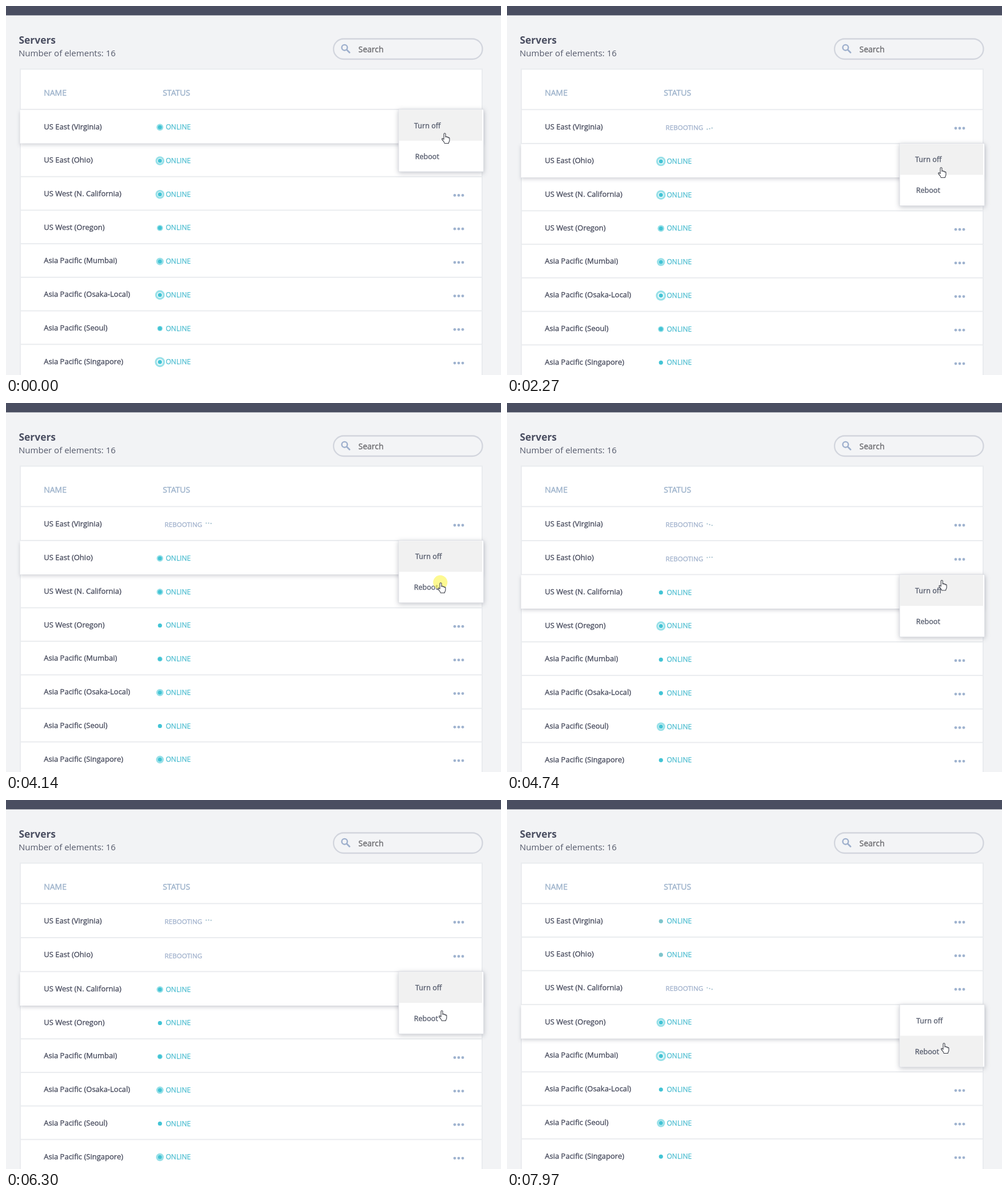
Recreate the animation shown at these times as an HTML page. Size 866 by 646 pixels, loop 8000 ms.

```html
<!DOCTYPE html>
<html lang="en">
<head>
<meta charset="utf-8">
<title>Servers</title>
<style>
  html, body { margin: 0; width: 100%; height: 100%; overflow: hidden; background: #f2f3f5; }
  svg { display: block; width: 866px; height: 646px; font-family: "Open Sans", "Noto Sans", sans-serif; }
  text { white-space: pre; }
  .title { font-size: 17.4px; font-weight: 700; fill: #4a4e61; }
  .count { font-size: 15px; fill: #555a6b; }
  .search { font-size: 14px; fill: #6a6a6e; stroke: #6a6a6e; stroke-width: .35px; }
  .head { font-size: 14px; fill: #9fb4cc; stroke: #9fb4cc; stroke-width: .45px; }
  .name { font-size: 13px; fill: #464a5c; stroke: #464a5c; stroke-width: .32px; }
  .online { font-size: 12px; fill: #4bbdd0; stroke: #4bbdd0; stroke-width: .25px; }
  .fresh { fill: #3cc2d6; stroke: #3cc2d6; stroke-width: .45px; }
  .reboot { font-size: 11.6px; fill: #9fb0cb; stroke: #9fb0cb; stroke-width: .3px; }
  .item { font-size: 12.6px; fill: #555b6c; stroke: #555b6c; stroke-width: .35px; }
  .line { fill: #eaecef; }
  .more { fill: #9fb3cf; }
  #lift { fill: #fff; filter: drop-shadow(0 3px 3px rgba(40, 45, 70, .2)); }
  #panel { fill: #fff; filter: drop-shadow(0 2px 4px rgba(40, 45, 70, .28)); }
</style>
</head>
<body>
<svg viewBox="0 0 866 646">
  <rect width="866" height="646" fill="#f2f3f5"/>
  <rect width="866" height="16.4" fill="#4a4e61"/>
  <text class="title" x="22.5" y="66">Servers</text>
  <text class="count" x="22" y="88">Number of elements: 16</text>
  <rect x="573" y="57.5" width="260.5" height="35.5" rx="17.75" fill="#f3f4f6" stroke="#d2d5dd" stroke-width="2.3"/>
  <g fill="none" stroke="#9fb0cd" stroke-width="2.4">
    <circle cx="592.3" cy="72.8" r="4.9"/>
    <path d="M596 76.5l5 5" stroke-width="2.8" stroke-linecap="round"/>
  </g>
  <text class="search" x="616.5" y="81">Search</text>
  <rect x="25" y="110.5" width="808" height="560" fill="#fff" stroke="#eaecef" stroke-width="2"/>
  <text class="head" x="66.2" y="157">NAME</text>
  <text class="head" x="274.2" y="157">STATUS</text>
  <g id="lines"></g>
  <rect id="lift" x="24.5" width="809" height="58.8"/>
  <g id="rows"></g>
  <g id="menu">
    <rect id="panel" x="687" width="148.5" height="109" stroke="#dfe1e6" stroke-width="1"/>
    <rect id="hover" x="688" width="145" height="54" fill="#f1f1f1"/>
    <text class="item" id="off" y="32.5">Turn off</text>
    <text class="item" id="re" y="86.5">Reboot</text>
  </g>
  <circle id="click" r="12.5" fill="#fcf551"/>
  <path id="hand" fill="#fff" stroke="#3c3f48" stroke-width="1.1" stroke-linejoin="round"
    d="M4 11.5V2.2a1.5 1.5 0 0 1 3 0V7.5a1.3 1.3 0 0 1 2.5 0V8a1.2 1.2 0 0 1 2.3.3V9a1.1 1.1 0 0 1 2.1.4V13.5c0 2-1.5 2.6-1.6 5H5.3C5.2 16.3 2.3 14 .9 11.6c-.8-1.4.8-2.3 1.7-1.2z"/>
</svg>
<script>
const LOOP = 8000, STEP = 72, TOP = 181, PITCH = 58.72, PULSE = 1090, SPIN = 723;

// Each row with the starting phase of its pulse
const ROWS = [['US East (Virginia)', .67], ['US East (Ohio)', .87], ['US West (N. California)', .87],
  ['US West (Oregon)', .6], ['Asia Pacific (Mumbai)', .73], ['Asia Pacific (Osaka-Local)', .93],
  ['Asia Pacific (Seoul)', .53], ['Asia Pacific (Singapore)', .98]];

// Scene n opens the menu of row n; the pointer travels to its second item and clicks
const SCENES = [
  { at: 0, move: [380, 1323], x: [762, 754], y: [222, 256], click: 1241 },
  { at: 1880, move: [3200, 3560], x: [754, 755], y: [282, 314], click: 3800 },
  { at: 4400, move: [4400, 5690], x: [755, 757], y: [301, 368], click: 5850 },
  { at: 6980, move: [6980, 7740], x: [758, 759], y: [385, 425], follow: true }
];
const LAST = SCENES.length - 1;
const RESTS = [[570, 1160], [6300, 6980]];
const CLICK_TIME = 450;

const $ = id => document.getElementById(id);
const clamp = v => Math.max(0, Math.min(1, v));
const fract = v => v - Math.floor(v);
const ease = u => u * u * (3 - 2 * u);
const lerp = ([a, b], u) => a + (b - a) * u;
const progress = ([a, b], t) => clamp((t - a) / (b - a));

function add(parent, tag, attrs, text) {
  const el = document.createElementNS('http://www.w3.org/2000/svg', tag);
  for (const key in attrs) set(el, key, attrs[key]);
  if (text) el.textContent = text;
  parent.appendChild(el);
  return el;
}
function set(el, key, value) { el.setAttribute(key, value); }
function show(el, on) { set(el, 'visibility', on ? 'visible' : 'hidden'); }
function move(el, x, y) { set(el, 'transform', `translate(${x.toFixed(2)} ${y.toFixed(2)})`); }

const rows = ROWS.map(([name, phase]) => {
  const line = add($('lines'), 'rect', { class: 'line', x: 24, y: -.7, width: 810, height: 2 });
  const g = add($('rows'), 'g', {});
  add(g, 'text', { class: 'name', x: 66.3, y: 34.5 }, name);
  for (const x of [785, 792, 799]) add(g, 'circle', { class: 'more', cx: x, cy: 33, r: 2.4 });
  const pulse = add(g, 'g', {});
  const disc = fill => add(pulse, 'circle', { cx: 269.3, cy: 31.3, r: 3.5, fill });
  const ring = disc('#97e0e8'), gap = disc('#e9f8fa'), dot = disc('#43c4d5');
  const online = add(g, 'text', { class: 'online', y: 35.2 }, 'ONLINE');
  const reboot = add(g, 'text', { class: 'reboot', x: 277.6, y: 35.8 }, 'REBOOTING');
  const spin = [0, 1, 2].map(k => add(g, 'circle', { cx: 350.3 + 4.2 * k, r: 1.1, fill: '#9dbccb' }));
  return { phase, line, g, pulse, ring, gap, dot, online, reboot, spin };
});

// The picture is refreshed in steps and stands still during rests
function tick(time) {
  let base = 0;
  for (const [from, to] of RESTS) {
    if (time >= from && time < to) return from;
    if (time >= to) base = to;
  }
  return base + Math.floor((time - base) / STEP) * STEP;
}

function drawPulse(r, t, still) {
  const grow = clamp((fract(r.phase + t / PULSE) - .4) / .6);
  const radius = still ? 3.5 : 3.5 + 5.5 * grow;
  set(r.ring, 'r', radius);
  set(r.gap, 'r', Math.max(0, radius - 3.1));
  set(r.dot, 'fill', still ? '#7fc4cb' : '#43c4d5');
}

function drawSpin(r, u, busy) {
  r.spin.forEach((dot, k) => {
    show(dot, busy && u > .15);
    set(dot, 'cy', 32 + 2.8 * Math.cos(2 * Math.PI * (u - .25) - .5 * k));
  });
}

function draw(time) {
  const t = tick(time);
  const n = SCENES.findLastIndex(s => t >= s.at), scene = SCENES[n];
  let y = TOP, openY;

  rows.forEach((r, i) => {
    const back = n === LAST && i < LAST - 1;
    const busy = i < n && !back;
    const fresh = back && t < scene.at + 420;
    if (i === n) openY = y;
    move(r.line, 0, y);
    move(r.g, 0, y);
    show(r.reboot, busy);
    show(r.online, !busy);
    show(r.pulse, !busy && !fresh);
    set(r.online, 'class', fresh ? 'online fresh' : 'online');
    set(r.online, 'x', fresh ? 278.3 : 279.5);
    drawPulse(r, t, back);
    drawSpin(r, fract((t - 650 + 200 * i) / SPIN), busy);
    y += PITCH + (busy ? 1 : 0);
  });

  const u = ease(progress(scene.move, t));
  const px = lerp(scene.x, u), py = lerp(scene.y, u);
  move($('hand'), px, py);
  show($('click'), t >= scene.click && t < scene.click + CLICK_TIME);
  move($('click'), px + 4.8, py);
  set($('click'), 'opacity', clamp((scene.click + CLICK_TIME - t) / 220) || 0);

  // The label under the pointer slides left
  const shift = clamp((py - openY - 45) / 20);
  set($('lift'), 'y', openY + .8);
  move($('menu'), 0, openY);
  set($('off'), 'x', 714 + 2 * shift);
  set($('re'), 'x', 715.7 - 2 * shift);
  set($('hover'), 'y', scene.follow && shift > .5 ? 54.5 : .8);
}

const start = performance.now();
function loop() {
  draw((performance.now() - start) % LOOP);
  requestAnimationFrame(loop);
}
loop();
</script>
</body>
</html>
```
